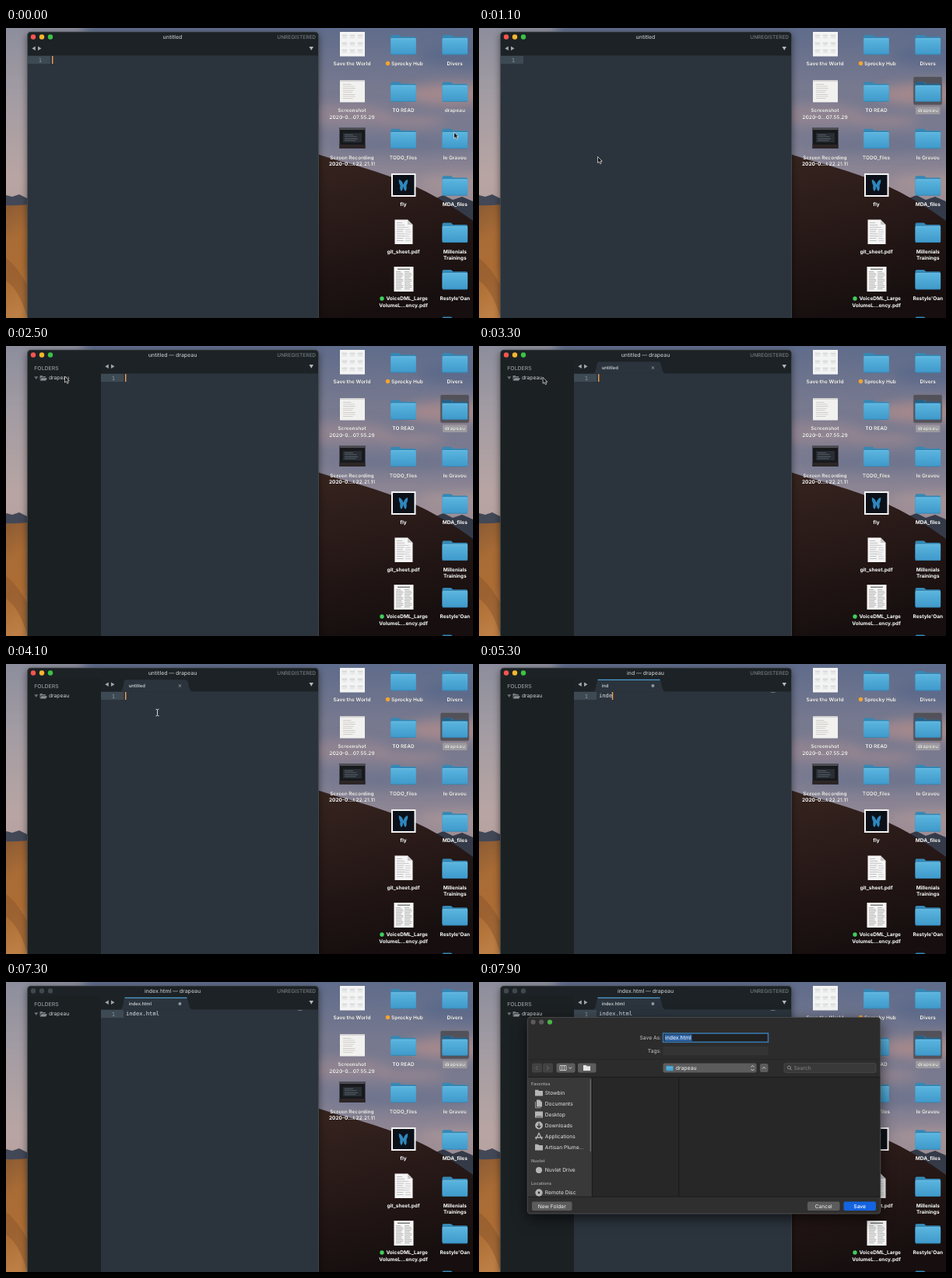
Animation of 600 by 373 pixels, one loop 8000 ms. Source, as an HTML page:

```html
<!DOCTYPE html>
<html lang="en">
<head>
<meta charset="utf-8">
<title>Desktop and editor</title>
<style>
  html, body { margin: 0; width: 100%; height: 100%; overflow: hidden; background: #1d1413; }
  svg { display: block; width: 100%; height: 100%; font-family: Inter, Roboto, sans-serif; text-rendering: geometricPrecision; }
  text { white-space: pre; }
  .label { font-size: 6.5px; font-weight: 700; fill: #fff; text-anchor: middle; filter: drop-shadow(0 .6px .7px rgba(0,0,0,.75)); }
  .mono { font-family: "DejaVu Sans Mono", monospace; font-size: 7.15px; }
  #window { filter: drop-shadow(0 3px 5px rgba(0,0,0,.5)); }
  #dialog { filter: drop-shadow(0 6px 9px rgba(0,0,0,.6)); }
</style>
</head>
<body>
<svg id="stage" viewBox="0 0 600 373" preserveAspectRatio="none">
  <defs>
    <linearGradient id="sky" x2="0" y2="1">
      <stop offset="0" stop-color="#5f6c8b"/><stop offset=".3" stop-color="#77798f"/>
      <stop offset=".6" stop-color="#7a7b91"/><stop offset=".85" stop-color="#9c8d96"/><stop offset="1" stop-color="#a5908f"/>
    </linearGradient>
    <linearGradient id="leftSky" x2="0" y2="1">
      <stop offset="0" stop-color="#878a9b"/><stop offset=".4" stop-color="#a39ca3"/>
      <stop offset=".8" stop-color="#b9a5a3"/><stop offset="1" stop-color="#b09c9b"/>
    </linearGradient>
    <linearGradient id="sand" x2=".2" y2="1">
      <stop offset="0" stop-color="#8a5a33"/><stop offset=".35" stop-color="#a96c36"/>
      <stop offset=".65" stop-color="#ad6d34"/><stop offset="1" stop-color="#bd7f45"/>
    </linearGradient>
    <linearGradient id="dune" x2=".25" y2="1">
      <stop offset="0" stop-color="#38251f"/><stop offset=".45" stop-color="#2a1b19"/><stop offset="1" stop-color="#170f0f"/>
    </linearGradient>
    <linearGradient id="front" x2="0" y2="1">
      <stop offset="0" stop-color="#5bb5df"/><stop offset="1" stop-color="#3f99ca"/>
    </linearGradient>
    <filter id="soft" x="-30%" y="-60%" width="160%" height="220%"><feGaussianBlur stdDeviation="7"/></filter>
    <clipPath id="windowClip"><path d="M27.5 373V10q0-5 5-5H396.500q5 0 5 5V373z"/></clipPath>
    <g id="folder">
      <path d="M-16.300 3q0-2 2-2h8.300q1.500 0 2.500 1.300l1 1H14.300q2 0 2 2V24h-32.600z" fill="#3588b5"/>
      <rect x="-16.300" y="5.300" width="32.600" height="21" rx="1.500" fill="url(#front)"/>
      <path d="M-16 5.700H16" stroke="#7cc6e6" stroke-width=".6"/>
      <path d="M-16 26H16" stroke="#2f7ca5" stroke-width=".6"/>
    </g>
  </defs>
</svg>
<script>
const stage = document.getElementById('stage');
const $ = id => document.getElementById(id);
const rect = (x, y, w, h, fill, extra = '') => `<rect x="${x}" y="${y}" width="${w}" height="${h}" fill="${fill}" ${extra}/>`;
const path = (d, fill, extra = '') => `<path d="${d}" fill="${fill}" ${extra}/>`;
const dot = (x, y, r, fill, extra = '') => `<circle cx="${x}" cy="${y}" r="${r}" fill="${fill}" ${extra}/>`;
const text = (x, y, s, size, fill, extra = '') => `<text x="${x}" y="${y}" font-size="${size}" fill="${fill}" ${extra}>${s}</text>`;
const stroke = (d, color, width = .8) => path(d, 'none', `stroke="${color}" stroke-width="${width}"`);
const cloud = (x, y, rx, ry, fill, opacity) => `<ellipse cx="${x}" cy="${y}" rx="${rx}" ry="${ry}" fill="${fill}" opacity="${opacity}"/>`;
const range = n => [...Array(n).keys()];
const middle = 'text-anchor="middle"';

// Desktop
const columns = [444.5, 510.5, 576.8], rowTop = r => 8 + r * 60.4;
const label = (x, r, ...lines) => lines.map((s, i) =>
  `<text class="label" x="${x}" y="${48 + r * 60.4 + i * 8.6}">${s}</text>`).join('');
const folder = (c, r, ...lines) =>
  `<use href="#folder" x="${columns[c]}" y="${rowTop(r)}"/>` + label(columns[c], r, ...lines);

// Rows of grey strokes standing for page text
const scribble = (x, y, w, rows, gap, color) => range(rows).map(i =>
  rect(x, y + i * gap, w * (.65 + .35 * Math.abs(Math.sin(i * 2.3))), .7, color)).join('');

const wallpaper = () =>
  rect(0, 0, 600, 250, 'url(#sky)') +
  `<g filter="url(#soft)">
    ${rect(-60, -20, 160, 270, 'url(#leftSky)')}
    ${cloud(575, 85, 65, 14, '#b58f8c', .7)}${cloud(435, 112, 60, 15, '#a08a93', .6)}
    ${cloud(515, 150, 85, 11, '#68718b', .6)}${cloud(590, 35, 60, 16, '#566789', .6)}
    ${cloud(520, 120, 45, 6, '#b0908f', .6)}${cloud(590, 198, 60, 10, '#b09a98', .6)}
  </g>` +
  path('M0 215L8 217L17 214L27 219L60 222V240H0z', '#434857') +
  path('M0 228Q18 229 40 225V373H0z', 'url(#sand)') +
  path('M0 296Q14 306 28 332V373Q16 335 0 325z', '#85522a', 'opacity=".45"') +
  path('M535 216L552 219L562 215L574 221L586 217L600 223V260H535z', '#343a48') +
  path('M380 155Q401 163 425 170Q475 183 520 201Q562 220 600 248V373H380z', 'url(#dune)');

const desktopItems = () => {
  const [a, b, c] = columns;
  let s = rect(429, 5, 32, 31.5, '#f4f4f4') + range(9).map(i => {
    const x = 431 + (i % 3) * 10, y = 8 + Math.floor(i / 3) * 9.5;
    return rect(x, y, 8, 6, '#eceded') + rect(x + 1, y + 1.5, 6, .6, '#b9bcbf') + rect(x + 2, y + 3.7, 4, .5, '#cbcdd0');
  }).join('') + label(a, 0, 'Save the World');
  s += rect(429, 67, 32, 28.5, '#f1f1ef') + rect(429, 67, 32, 2, '#d4d4d4') +
    scribble(433, 72, 16, 8, 2.6, '#c3bfba') + label(a, 1, 'Screenshot', '2020-0...07.55.29');
  s += rect(428.5, 128, 33, 27, '#17191c') + rect(428.5, 128, 33, 3, '#4d4d55') +
    rect(433, 135, 24, 12, '#292e34') + scribble(435, 137, 17, 4, 2.5, '#67707a') +
    rect(428.5, 150, 33, 5, '#2c2526') + label(a, 2, 'Screen Recording', '2020-0...t 22.21.11');

  s += folder(1, 0) + dot(490.5, 45.5, 2.7, '#f3a32f') + label(515.5, 0, 'Sprocky Hub');
  s += folder(1, 1, 'TO READ') + folder(1, 2, 'TODO_files');
  s += rect(495, 187, 31.5, 30, '#f5f5f5') + rect(497, 189, 27.5, 26, '#0c1119') +
    path('M510.300 201Q508.500 195.500 504.700 195Q504.500 199.500 506.500 203Q505.500 207 507.800 210Q510 208 510.400 204Q511 208 513.200 210Q515.500 207 514.500 203Q516.500 199.500 516.300 195Q512.500 195.500 510.700 201z', '#2f87bd') +
    label(b, 3, 'fly');
  s += path('M499.500 246.500H516L522.500 253V278H499.500z', '#f5f5f5') + path('M516 246.500V253H522.500z', '#c9c9c9') +
    scribble(502, 250, 11, 9, 2.9, '#a9a9a9') + scribble(513, 256, 7, 7, 2.9, '#b9b9b9') + label(b, 4, 'git_sheet.pdf');
  s += rect(498.5, 307, 25, 32, '#f6f6f6') + rect(503, 309.5, 16, 1.4, '#777') +
    scribble(501, 313, 9.5, 12, 2, '#9a9a9a') + scribble(512, 313, 9.5, 12, 2, '#9a9a9a') +
    dot(483, 348, 2.7, '#3fcf5b') + label(515.2, 5, 'VoiceDML_Large') +
    `<text class="label" x="${b}" y="358.6">VolumeL...ency.pdf</text>`;

  s += folder(2, 0, 'Divers');
  s += `<g id="selection">${rect(558, 62.5, 37, 36.5, '#4b4b52', 'rx="2" opacity=".85" stroke="#77777e" stroke-width=".7"')}
    ${rect(561, 101.5, 31.5, 9.5, '#9c9a9f', 'rx="1.5"')}</g>`;
  s += folder(2, 1, 'drapeau') +
    `<g id="shade">${path('M560.700 69.400h10.500l2 2.300h20V73.500H560.700z', '#17496b', 'opacity=".6"')}</g>`;
  return s + folder(2, 2, 'le Gravou') + folder(2, 3, 'MDA_files') +
    folder(2, 4, 'Millenials', 'Trainings') + folder(2, 5, "Restyle'Oan") + folder(2, 6);
};

// Editor window
const editor = () => `<g id="window"><g clip-path="url(#windowClip)">
  ${rect(27, 5, 375, 368, '#1c2225')}
  <g id="pane">
    ${rect(28, 35.3, 374, 338, '#2b343d')}
    ${rect(28, 36, 29, 10, '#3d4953')}
    <text class="mono" x="41.700" y="43.600" fill="#89959d">1</text>
    ${path('M37.800 23.600V28.900L33.300 26.200z', '#a2a7aa')}${path('M41 23.600V28.900L45.500 26.200z', '#a2a7aa')}
    <text class="mono" id="code" x="60" y="43.300" fill="#dce1e8"></text>
    ${rect(59, 36, 1.4, 10, '#f3a052', 'id="caret"')}
  </g>
  <g id="tab">
    ${path('M146 35.500Q149 35 150 31L151.500 23Q152 20.300 155 20.300H230Q233 20.300 233.700 23L235.500 31Q236.500 35 240 35.500z', '#2b343d')}
    ${text(157.7, 30.2, '', 5.9, '#d9dde0', 'id="tabName" font-weight="500"')}
    <g id="cross">${stroke('M221.700 26.300l3.400 3.400m0-3.400l-3.400 3.400', '#a2a9ae')}</g>
    <g id="dirty">${stroke('M152.500 20.400H232.500', '#4e9bd0', 1.1)}${dot(223.4, 28, 2, '#8c979e')}${rect(375, 36, 5.5, .8, '#7b858d')}</g>
  </g>
  <g id="sidebar">
    ${rect(27, 18, 95, 355, '#1b2023')}
    ${text(36.3, 31.3, 'FOLDERS', 6.9, '#91979a', 'font-weight="500"')}
    ${path('M36.300 39.200H41.300L38.800 42.900z', '#6b7174')}
    ${path('M43.500 38h3l1 1H51v1.500H45L43.500 44z', '#777d80')}${path('M45.500 41.200H53L51.200 44.600H43.700z', '#8b9194')}
    ${text(55, 43, 'drapeau', 6.7, '#d0d4d6')}
  </g>
  ${rect(27, 5, 375, 13, '#1c2225')}
  ${dot(35, 11.5, 3.2, '#f2564f', 'class="light"')}${dot(46, 11.5, 3.2, '#f5b62f', 'class="light"')}${dot(57, 11.5, 3.2, '#3bc344', 'class="light"')}
  ${text(214, 14.1, '', 6.9, '#bdc1c3', `id="title" ${middle} font-weight="500"`)}
  ${text(398, 14.1, 'UNREGISTERED', 6.5, '#767c7f', 'text-anchor="end" font-weight="500"')}
  ${path('M389.500 24H395L392.250 28.700z', '#b4b8ba')}
  </g>${stroke('M27.500 373V10q0-5 5-5H396.500q5 0 5 5V373', '#555d61', .6)}</g>`;

// Save dialog
const button = (x, y, w, h, fill = '#5d5c5c') => rect(x, y, w, h, fill, 'rx="2"');
const place = (y, name, icon) => `<g transform="translate(77 ${y})">${icon}</g>` + text(84.8, y + 2.4, name, 6.7, '#e5e5e5');
const heading = (y, s) => text(67, y, s, 5.5, '#a09f9f', 'font-weight="600"');
const miniFolder = path('M-5 -3.800h4l1 1.300h5V4H-5z', '#b5b5b5');
const dialog = () => `<g id="dialog">
  ${rect(62.3, 45.3, 453.5, 252.7, '#2d2c2c', 'rx="4"')}
  ${dot(69.6, 51.5, 3.1, '#5d5c5c')}${dot(80.2, 51.5, 3.1, '#5d5c5c')}${dot(91, 51.5, 3.1, '#48b749')}
  ${text(234, 74.4, 'Save As:', 6.7, '#c9c8c8', 'text-anchor="end"')}
  ${text(234, 91, 'Tags:', 6.7, '#c9c8c8', 'text-anchor="end"')}
  ${rect(236.5, 66, 135, 11.3, '#202020', 'stroke="#3976aa" stroke-width="1.6"')}
  ${rect(238.5, 67.5, 35, 8.6, '#2d63a5')}${text(239, 74.4, 'index.html', 6.9, '#fff')}
  ${rect(236.5, 83, 135, 11, '#353434')}
  ${stroke('M62.500 99.500H515.500', '#242323', .6)}
  ${button(68, 104.5, 13, 12, '#434242')}${button(82, 104.5, 13, 12, '#434242')}
  ${stroke('M75.500 108l-2.500 2.500l2.500 2.500M87 108l2.500 2.500l-2.500 2.500', '#777')}
  ${button(99.5, 104.5, 24, 12)}${stroke('M104 107.500h8v6h-8zM106.700 107.500v6M109.400 107.500v6M115.500 109.500l1.700 2l1.700-2', '#e0e0e0')}
  ${button(127, 104.5, 23.5, 12)}<g transform="translate(138.500 110.500) scale(.9)">${path('M-5 -3.800h4l1 1.300h5V4H-5z', '#e6e6e6')}</g>
  ${button(236.5, 104.5, 120, 12)}<use href="#folder" transform="translate(245 107.200) scale(.27)"/>
  ${text(252.7, 113, 'drapeau', 6.9, '#f1f1f1')}${stroke('M349.500 109.500l2-2l2 2M349.500 112l2 2l2-2', '#eee')}
  ${button(361, 105, 10.5, 11)}${stroke('M364.200 111.500l2-2l2 2', '#eee')}
  ${rect(392, 104.5, 118, 12, '#3a3939', 'rx="2" stroke="#555" stroke-width=".5"')}
  <circle cx="398.500" cy="110" r="2" fill="none" stroke="#aaa" stroke-width=".7"/>${stroke('M400 111.500l1.800 1.800', '#aaa')}
  ${text(404.5, 113, 'Search', 6.7, '#858484')}
  ${rect(62.6, 122.3, 453, 154, '#282727')}${rect(62.6, 122.3, 82.5, 154, '#3a3939')}
  ${stroke('M62.500 122.300H515.500M145.400 122V276M256.700 122V276M62.500 276.300H515.500', '#161616', .8)}
  ${stroke('M143.300 125V218', '#666', 1.4)}
  ${heading(133, 'Favorites')}
  ${place(142.5, 'Stowbin', miniFolder)}
  ${place(156.5, 'Documents', path('M-3 -5h4l3 3V4H-3z', '#b5b5b5') + stroke('M-4.500 -2.500V5.300H2.500', '#b5b5b5'))}
  ${place(170.5, 'Desktop', rect(-5, -4, 10, 8, '#b5b5b5') + rect(-3.5, 2, 7, 1, '#555'))}
  ${place(184.5, 'Downloads', dot(0, 0, 4.9, '#b5b5b5') + stroke('M0 -3V2.500M-2.200 .5L0 2.800L2.200 .5', '#333', 1.2))}
  ${place(198.5, 'Applications', stroke('M-4 4L0 -4L4 4M-5 1.500H5', '#b5b5b5', 1.3))}
  ${place(212.5, 'Artisan Plume...', miniFolder)}
  ${heading(231.8, 'Nuvlet')}
  ${place(242, 'Nuvlet Drive', dot(0, 0, 4, '#b5b5b5'))}
  ${heading(261, 'Locations')}
  ${place(271, 'Remote Disc', dot(0, 0, 4.7, '#b5b5b5') + dot(0, 0, 1.4, '#3a3939'))}
  ${path('M62.600 276.700H515.500V294q0 4-4 4H66.600q-4 0-4-4z', '#302f2f')}
  ${button(68, 282.5, 51.5, 11.5)}${text(93.7, 290.7, 'New Folder', 6.7, '#f1f1f1', middle)}
  ${button(422, 282.5, 41.5, 11.5)}${text(442.7, 290.7, 'Cancel', 6.7, '#f1f1f1', middle)}
  ${button(468.5, 282.5, 41.5, 11.5, '#1463df')}${text(489.2, 290.7, 'Save', 6.7, '#fff', middle + ' font-weight="500"')}
  ${rect(62.3, 45.3, 453.5, 252.7, 'none', 'rx="4" stroke="#656565" stroke-width=".6"')}
</g>`;

const pointers = () => `<use id="ghost" href="#folder" opacity=".5"/>
  <g id="arrow">${path('M0 0V8L1.900 6.400L3.200 9.200L4.700 8.500L3.400 5.800H5.800z', '#111', 'stroke="#fff" stroke-width=".65"')}</g>
  <g id="beam">${stroke('M-2 -4.300Q0 -4.300 0 -3V3Q0 4.300 -2 4.300M2 -4.300Q0 -4.300 0 -3M0 3Q0 4.300 2 4.300', '#e9ecef', .9)}</g>`;

stage.insertAdjacentHTML('beforeend', wallpaper() + desktopItems() + editor() + dialog() + pointers());

// Timeline
const LOOP = 8000, STEP = 100;
const FILE = 'index.html', TYPE_START = 4700, KEY_TIME = 200;
const pointerPath = [
  [0, 575.5, 134], [200, 575.5, 134], [400, 576, 80], [1000, 152.5, 165.5], [1600, 152.5, 165.5],
  [2400, 75.5, 39], [3200, 75.5, 39], [3900, 194.5, 62.5], [LOOP, 194.5, 62.5]
];
const clamp = v => Math.max(0, Math.min(1, v));
const ease = v => { v = clamp(v); return v * v * (3 - 2 * v); };

function pointerAt(t) {
  const i = pointerPath.findIndex(p => p[0] > t);
  const [t0, x0, y0] = pointerPath[i - 1], [t1, x1, y1] = pointerPath[i];
  const k = ease((t - t0) / (t1 - t0));
  return [x0 + (x1 - x0) * k, y0 + (y1 - y0) * k];
}
const typedAt = t => FILE.slice(0, Math.max(0, Math.floor((t - TYPE_START) / KEY_TIME) + 1));
const show = (id, on) => { $(id).style.display = on ? '' : 'none'; };
const move = (id, x, y) => $(id).setAttribute('transform', `translate(${x} ${y})`);
const lights = [...document.querySelectorAll('.light')];
const lightColors = lights.map(l => l.getAttribute('fill'));

function draw(t) {
  const [x, y] = pointerAt(t);
  const opened = ease((t - 1300) / 300), unfocused = t >= 7200;
  const code = typedAt(t), name = typedAt(t - 100) || 'untitled';

  show('selection', t >= 400);
  show('shade', t >= 400);
  move('sidebar', -95 * (1 - opened), 0);
  move('pane', 94 * opened, 0);
  show('tab', t >= 3300);
  show('cross', !code);
  show('dirty', code);
  $('tabName').textContent = name;
  $('title').textContent = name + (t >= 1400 ? ' — drapeau' : '');
  $('code').textContent = code;

  const typing = t >= TYPE_START && t < 6700;
  show('caret', (t < 400 || t >= 1400) && !unfocused && (typing || t % 1000 < 600));
  $('caret').setAttribute('x', 59 + code.length * 4.305 + (code ? .6 : 0));
  lights.forEach((l, i) => l.setAttribute('fill', unfocused ? '#41484b' : lightColors[i]));

  const overText = t >= 3200 && x > 150 && y > 36;
  show('arrow', t < TYPE_START && !overText);
  show('beam', t < TYPE_START && overText);
  show('ghost', t > 400 && t <= 1000);
  move('arrow', x, y);
  move('beam', x, y);
  move('ghost', x, y - 12);

  show('dialog', t >= 7400);
  $('dialog').style.opacity = clamp((t - 7300) / 300);
}

function tick() {
  draw(Math.floor(performance.now() % LOOP / STEP) * STEP);
  requestAnimationFrame(tick);
}
tick();
</script>
</body>
</html>
```
